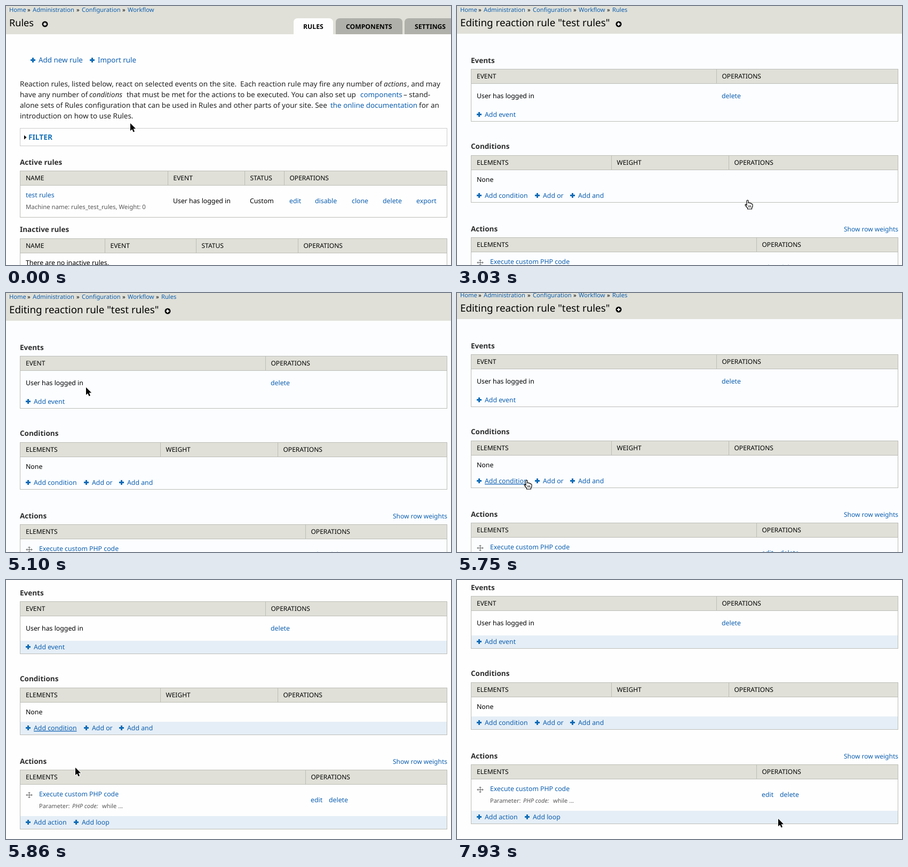
An HTML page for the animation above (7990 ms loop, 834x486 px).

```html
<!DOCTYPE html>
<html lang="en">
<head>
<meta charset="utf-8">
<title>Rules administration</title>
<style>
html, body { margin: 0; width: 834px; height: 486px; overflow: hidden; background: #fefefe; }
svg { display: block; }
text { font-family: "Noto Sans", "Open Sans", sans-serif; font-size: 12.3px; fill: #000; text-rendering: geometricPrecision; white-space: pre; }
.link { fill: #0d5fb0; }
.prose { font-size: 13.5px; fill: #222; }
.prose.link, .big { font-size: 13.4px; fill: #0d5fb0; }
.em { font-style: italic; }
.crumb { font-size: 11.2px; }
.h { font-size: 13.5px; font-weight: bold; fill: #2c2c2c; }
.th { font-size: 12px; }
.tab { font-size: 12.2px; font-weight: bold; }
.small { font-size: 11.4px; fill: #555; }
.param { font-size: 11px; fill: #555; }
.filter { font-size: 13.7px; font-weight: bold; fill: #1470b8; }
.hover { text-decoration: underline; }
</style>
</head>
<body>
<svg width="834" height="486" viewBox="0 0 834 486">
  <rect id="back" width="834" height="486"/>
  <g id="list"></g>
  <g id="edit"></g>
  <g id="cursor">
    <path id="arrow" d="M0 0V14.2L3.3 11.2 5.6 16.6 8 15.6 5.7 10.3H10.2Z" stroke="#fff" stroke-width="1.6" paint-order="stroke"/>
    <path id="beam" d="M-3-8Q0-8 0-6V6Q0 8-3 8M3-8Q0-8 0-6M0 6Q0 8 3 8M-2 3H2" fill="none" stroke="#000" stroke-width="1.2"/>
    <g id="hand">
      <path d="M-2 10V1.8Q-2 .3-.5 .3T1 1.8V6Q1 5 2.5 5T4 6.5Q4.5 5.5 5.7 6T7 7.5Q9 7 9 9V12L7.5 15V17H-.5V15L-4.5 10.5Q-5.5 8-3.5 8Z" fill="#fff" stroke="#000" stroke-width="1.2"/>
      <path d="M1.5 10V14M3.5 10V14M5.5 10V14" stroke="#000" stroke-width=".8"/>
    </g>
  </g>
</svg>
<script>
const $ = id => document.getElementById(id);
const LINE = '#bcbdb7', BAR = '#e0e0d8';

const text = (x, y, s, cls = '', id = '') => `<text x="${x}" y="${y}" class="${cls}" id="${id}">${s}</text>`;
const link = (x, y, s, id) => text(x, y, s, 'link', id);
const rect = (x, y, w, h, fill, more = '') => `<rect x="${x}" y="${y}" width="${w}" height="${h}" fill="${fill}" ${more}/>`;
const plus = (x, y) => `<path d="M${x - 4.5} ${y}h9M${x} ${y - 4.5}v9" stroke="#0d6cb8" stroke-width="3"/>`;
const add = (x, y, s, cls = 'link', id) => plus(x + 4.5, y - 4.5) + text(x + 15, y, s, cls, id);
const gear = x => `<circle cx="${x}" cy="34" r="5.5"/><path d="M${x - 3} 34h6M${x} 31v6" stroke="#fff" stroke-width="2"/>`;

function table(y, height, columns, foot) {
  let s = rect(26, y, 801, 27, BAR);
  if (foot) s += rect(26, y + height - 24, 801, 24, '#e5eef6', 'class="foot"');
  s += rect(26.5, y + .5, 800, height, 'none', `stroke="${LINE}"`);
  s += `<path d="M26 ${y + 27.5}H827" stroke="${LINE}"/>`;
  for (const [x, label] of columns) {
    if (x > 27) s += `<path d="M${x + .5} ${y}v27" stroke="${LINE}"/>`;
    s += text(x + (x > 27 ? 10.5 : 11), y + 17.5, label, 'th');
  }
  return s;
}

function crumbs(items) {
  return items.map(([x, s], i) =>
    (i ? text(x - 10, 11, '»', 'crumb') : '') + text(x, 11, s, 'crumb link')).join('');
}

const tab = (x, w, tx, s, fill) =>
  `<path d="M${x} 53V31q0-8 8-8h${w - 16}q8 0 8 8v22z" fill="${fill}"/>` + text(tx, 43, s, 'tab');

const trail = [[6, 'Home'], [50, 'Administration'], [142, 'Configuration'], [228, 'Workflow']];

$('list').innerHTML =
  rect(0, 0, 834, 53, BAR) + crumbs(trail) +
  `<text x="6" y="38" style="font-size:18.1px">Rules</text>` + gear(73) +
  tab(539, 74, 557, 'RULES', '#fefefe') +
  tab(618, 125, 637, 'COMPONENTS', '#b0b0aa') +
  tab(747, 110, 766, 'SETTINGS', '#b0b0aa') +
  add(46, 106, 'Add new rule', 'big') + add(157, 106, 'Import rule', 'big') +
  text(26, 151, 'Reaction rules, listed below, react on selected events on the site.', 'prose') +
  text(439, 151, 'Each reaction rule may fire any number of', 'prose') +
  text(708, 151, 'actions', 'prose em') + text(752, 151, ', and may', 'prose') +
  text(26, 171, 'have any number of', 'prose') + text(156, 171, 'conditions', 'prose em') +
  text(226, 171, 'that must be met for the actions to be executed. You can also set up', 'prose') +
  text(664, 171, 'components', 'prose link') + text(745, 171, '– stand-', 'prose') +
  text(26, 191, 'alone sets of Rules configuration that can be used in Rules and other parts of your site. See', 'prose') +
  text(608, 191, 'the online documentation', 'prose link') + text(774, 191, 'for an', 'prose') +
  text(26, 211, 'introduction on how to use Rules.', 'prose') +
  rect(26.5, 229.5, 800, 33, 'none', 'stroke="#ccc"') +
  '<path d="M34 242.5L38.5 246.5 34 250.5Z"/>' + text(42, 251, 'FILTER', 'filter') +
  text(26, 298, 'Active rules', 'h') +
  table(309, 87, [[26, 'NAME'], [303, 'EVENT'], [447, 'STATUS'], [521, 'OPERATIONS']]) +
  link(37, 359, 'test rules', 'testLink') +
  text(37, 381, 'Machine name: rules_test_rules, Weight: 0', 'small') +
  text(313, 370, 'User has logged in') + text(457, 370, 'Custom') +
  link(531, 370, 'edit', 'editLink') + link(579, 370, 'disable') + link(648, 370, 'clone') +
  link(706, 370, 'delete') + link(769, 370, 'export') +
  text(26, 424, 'Inactive rules', 'h') +
  table(436, 80, [[26, 'NAME'], [185, 'EVENT'], [356, 'STATUS'], [547, 'OPERATIONS']]) +
  text(37, 486, 'There are no inactive rules.');

$('edit').innerHTML =
  rect(0, 0, 834, 52, BAR) + crumbs([...trail, [291, 'Rules']]) +
  `<text x="6" y="38" style="font-size:18.8px">Editing reaction rule "test rules"</text>` + gear(303) +
  text(26, 107, 'Events', 'h') +
  table(118, 98, [[26, 'EVENT'], [486, 'OPERATIONS']], true) +
  text(37, 173, 'User has logged in') + link(496, 173, 'delete') + add(37, 208, 'Add event') +
  text(26, 268, 'Conditions', 'h') +
  table(280, 88, [[26, 'ELEMENTS'], [289, 'WEIGHT'], [509, 'OPERATIONS']], true) +
  text(37, 330, 'None') +
  add(37, 360, 'Add condition', 'link', 'conditionLink') + add(146, 360, 'Add or') + add(212, 360, 'Add and') +
  text(26, 423, 'Actions', 'h') +
  `<text x="827" y="423" class="link" text-anchor="end" style="font-size:12px">Show row weights</text>` +
  table(434, 111, [[26, 'ELEMENTS'], [561, 'OPERATIONS']], true) +
  '<path d="M38 481.5h11M43.5 476v11M41.5 478l2-2 2 2M41.5 485l2 2 2-2M40 479.5l-2 2 2 2M47 479.5l2 2-2 2" fill="none" stroke="#666"/>' +
  link(62, 484, 'Execute custom PHP code', 'codeLink') +
  text(62, 506, 'Parameter:', 'param') + text(124, 506, 'PHP code:', 'param em') + text(180, 506, 'while ...', 'param') +
  link(571, 495, 'edit') + link(605, 495, 'delete') +
  add(37, 537, 'Add action') + add(127, 537, 'Add loop');

// Pointer stops: time, x, y
const path = [
  [0, 233, 220], [40, 233, 220], [240, 364, 328], [790, 364, 328], [1320, 78, 354],
  [1570, 78, 354], [1740, 230, 371], [1970, 609, 396], [2100, 609, 396], [2430, 545, 364],
  [3060, 545, 364], [3330, 365, 221], [3650, 365, 221], [3920, 146, 271],
  [4370, 146, 271], [4630, 58, 168], [4760, 58, 168], [5100, 150, 177],
  [5340, 150, 177], [5570, 131, 351], [5800, 131, 351], [5810, 130, 352], [6240, 130, 352],
  [6690, 102, 397], [6869, 102, 397], [6870, 103, 398], [7470, 103, 398],
  [7810, 590, 455], [7930, 602, 448], [7990, 602, 448]
];
const shapes = [
  [0, 'arrow'], [1260, 'hand'], [1620, 'beam'], [1800, 'arrow'], [2350, 'hand'], [3090, 'arrow'],
  [4570, 'beam'], [4930, 'arrow'], [5510, 'hand'], [5805, 'arrow'], [6570, 'hand'], [7560, 'arrow']
];
const scrolls = [[0, 0], [5750, 3], [5805, 35], [5860, 78], [5920, 88]];
const hovers = {
  testLink: [1260, 1620], editLink: [2350, 3030], conditionLink: [5510, 5920], codeLink: [6570, 7560]
};
const LOOP = 7990, PAGE_CHANGE = 3030, FOOT_SHOWN = 5805;

const latest = (list, t) => list.findLast(k => k[0] <= t)[1];
const show = (el, on) => { el.style.display = on ? '' : 'none'; };

function pointer(t) {
  const i = path.findIndex(k => k[0] > t);
  const [t0, x0, y0] = path[i - 1], [t1, x1, y1] = path[i];
  const p = (t - t0) / (t1 - t0);
  return [Math.round(x0 + (x1 - x0) * p), Math.round(y0 + (y1 - y0) * p)];
}

const feet = document.querySelectorAll('.foot');

function draw(now) {
  const t = now % LOOP, editing = t >= PAGE_CHANGE, tinted = editing && t < FOOT_SHOWN;
  show($('list'), !editing);
  show($('edit'), editing);
  $('back').setAttribute('fill', tinted ? '#fbfdff' : '#fefefe');
  feet.forEach(el => show(el, t >= FOOT_SHOWN));
  $('edit').setAttribute('transform', `translate(0 ${-latest(scrolls, t)})`);
  for (const id in hovers) $(id).classList.toggle('hover', t >= hovers[id][0] && t < hovers[id][1]);
  $('cursor').setAttribute('transform', `translate(${pointer(t)})`);
  const shape = latest(shapes, t);
  for (const id of ['arrow', 'beam', 'hand']) show($(id), id === shape);
}

const start = performance.now();
function tick() {
  draw(performance.now() - start);
  requestAnimationFrame(tick);
}
tick();
</script>
</body>
</html>
```
